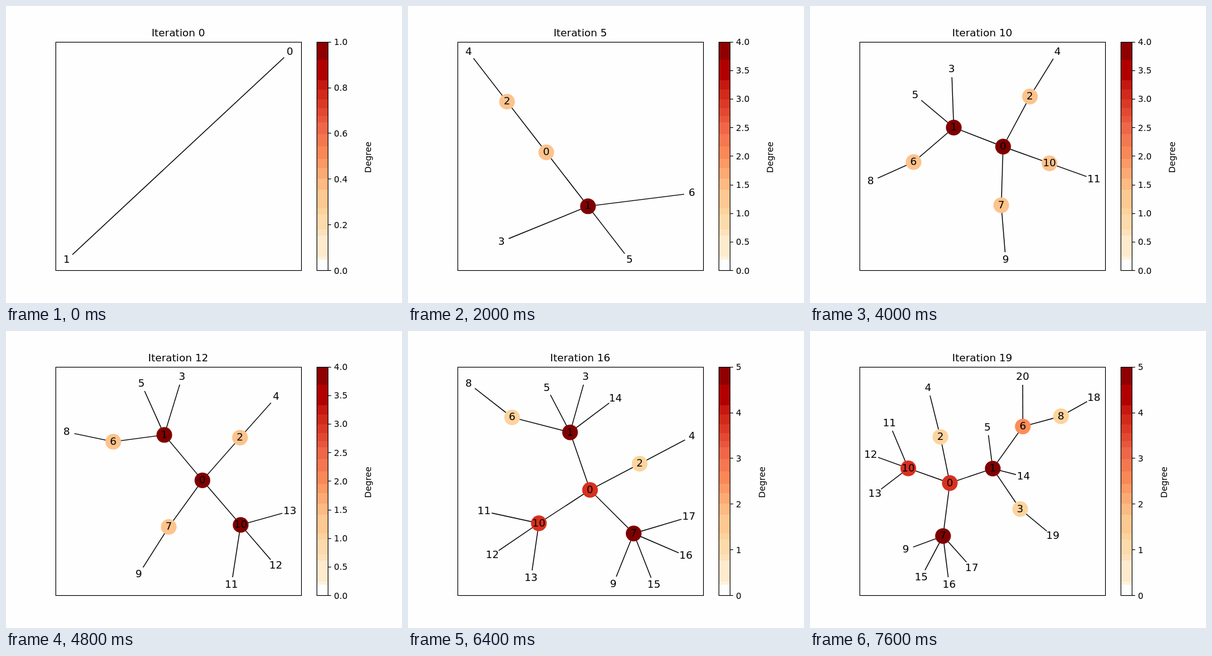
Write an HTML page that moves like this. It is 640x480 px and loops after 8000 ms.

```html
<!DOCTYPE html>
<html lang="en">
<head>
<meta charset="utf-8">
<title>Growing tree</title>
<style>
  html, body { margin: 0; width: 100%; height: 100%; overflow: hidden; background: #fefefe; }
  svg { display: block; width: 640px; height: 480px; font-family: "DejaVu Sans", sans-serif; }
</style>
</head>
<body>
<svg id="stage" viewBox="0 0 640 480"></svg>
<script>
const STEP = 400, COUNT = 20, BG = '#fefefe';
// parent of every node; node k + 1 joins at iteration k
const parent = [-1, 0, 0, 1, 2, 1, 1, 0, 6, 7, 0, 10, 10, 10, 1, 7, 7, 7, 8, 3, 6];

// Tree distances
const dist = parent.map(() => []);
parent.forEach((p, i) => {
  dist[i][i] = 0;
  for (let j = 0; j < i; j++) dist[i][j] = dist[j][i] = dist[p][j] + 1;
});

const dot = (a, b) => a.reduce((s, v, i) => s + v * b[i], 0);
const axpy = (k, a, b) => b.map((v, i) => v + k * a[i]);

// Kamada-Kawai energy and gradient of a flat x, y vector
function energy(pos) {
  const g = pos.map(() => 0), sum = [0, 0];
  let f = 0;
  pos.forEach((v, i) => sum[i % 2] += v);
  for (let i = 0; i < pos.length / 2; i++) {
    for (let j = 0; j < i; j++) {
      const dx = pos[2 * i] - pos[2 * j], dy = pos[2 * i + 1] - pos[2 * j + 1];
      const r = Math.hypot(dx, dy) || 1e-9, w = 1 / dist[i][j], off = r * w - 1;
      const k = 2 * w * off / r;
      f += off * off;
      g[2 * i] += k * dx; g[2 * i + 1] += k * dy;
      g[2 * j] -= k * dx; g[2 * j + 1] -= k * dy;
    }
  }
  return { f: f + 5e-4 * dot(sum, sum), g: g.map((v, i) => v + 1e-3 * sum[i % 2]) };
}

// Minimum of the cubic, or secant zero of the slope, through two line points
function cubic(a, b) {
  const h = b.t - a.t, th = 3 * (a.f - b.f) / h + a.d + b.d;
  const ga = Math.sign(h) * Math.sqrt(Math.max(0, th * th - a.d * b.d));
  return a.t + (ga - a.d + th) / (2 * ga - a.d + b.d) * h;
}
const secant = (a, b) => b.t + b.d / (b.d - a.d) * (a.t - b.t);

// More-Thuente line search
function search(probe, start, t) {
  let x = start, y = null, lo = 0, hi = 5 * t, width = 1e10, width1 = 2e10;
  for (let n = 0; ; n++) {
    const p = probe(t);
    const low = p.f <= start.f + 1e-3 * t * start.d;
    if (n > 19 || low && Math.abs(p.d) <= -0.9 * start.d) return p;
    const flip = p.d * x.d < 0, end = p.t > x.t ? hi : lo;
    let next;
    if (p.f > x.f) {
      const c = cubic(x, p), h = p.t - x.t;
      const q = x.t + x.d / ((x.f - p.f) / h + x.d) / 2 * h;
      next = Math.abs(c - x.t) < Math.abs(q - x.t) ? c : (c + q) / 2;
    } else if (flip) {
      const c = cubic(x, p), q = secant(x, p);
      next = Math.abs(c - p.t) > Math.abs(q - p.t) ? c : q;
    } else if (Math.abs(p.d) < Math.abs(x.d)) {
      let c = cubic(x, p);
      if (!isFinite(c) || (c - p.t) * (p.t - x.t) <= 0) c = end;
      const q = secant(x, p), nearC = Math.abs(c - p.t) < Math.abs(q - p.t);
      next = nearC === !!y ? c : q;
      if (y) {
        const cap = p.t + 0.66 * (y.t - p.t);
        next = p.t > x.t ? Math.min(cap, next) : Math.max(cap, next);
      } else next = Math.max(lo, Math.min(hi, next));
    } else next = y ? cubic(p, y) : end;

    if (p.f > x.f) y = p;
    else {
      if (flip) y = x;
      x = p;
    }
    t = next;
    if (y) {
      const gap = Math.abs(y.t - x.t);
      if (gap >= 0.66 * width1) t = (x.t + y.t) / 2;
      width1 = width;
      width = gap;
      lo = Math.min(x.t, y.t);
      hi = Math.max(x.t, y.t);
    } else {
      lo = t + 1.1 * (t - x.t);
      hi = t + 4 * (t - x.t);
    }
  }
}

// Limited-memory BFGS
function minimise(pos) {
  let { f, g } = energy(pos);
  const mem = [];
  for (let n = 0; n < 300 && Math.max(...g.map(Math.abs)) > 1e-5; n++) {
    let q = g;
    const as = [];
    for (let i = mem.length - 1; i >= 0; i--) {
      as[i] = dot(mem[i].s, q) / mem[i].sy;
      q = axpy(-as[i], mem[i].y, q);
    }
    if (mem.length) {
      const m = mem[mem.length - 1], k = m.sy / dot(m.y, m.y);
      q = q.map(v => v * k);
    }
    mem.forEach((m, i) => q = axpy(as[i] - dot(m.y, q) / m.sy, m.s, q));
    const dir = q.map(v => -v), slope = dot(dir, g);
    if (!(slope < 0)) break;
    const probe = t => {
      const at = axpy(t, dir, pos), e = energy(at);
      return { t, at, f: e.f, g: e.g, d: dot(e.g, dir) };
    };
    const p = search(probe, { t: 0, f, d: slope }, n ? 1 : 1 / Math.sqrt(dot(dir, dir)));
    if (!isFinite(p.f)) break;
    const s = axpy(-1, pos, p.at), y = axpy(-1, g, p.g), sy = dot(s, y);
    if (sy > 1e-16) mem.push({ s, y, sy });
    if (mem.length > 10) mem.shift();
    const done = (f - p.f) / Math.max(f, p.f, 1) < 2.2e-9;
    pos = p.at; f = p.f; g = p.g;
    if (done) break;
  }
  return pos;
}

// Start n nodes on a circle and relax; single precision sets the first tilt
function relax(n) {
  const start = [], mean = [0, 0];
  for (let i = 0; i < n; i++) {
    const a = Math.fround(2 * Math.PI * i / n);
    start.push(Math.fround(Math.cos(a)), Math.fround(Math.sin(a)));
  }
  start.forEach((v, i) => mean[i % 2] += v / n);
  const centred = start.map((v, i) => v - mean[i % 2]);
  const size = Math.max(...centred.map(Math.abs));
  const pos = minimise(centred.map(v => v / size));
  return Array.from({ length: n }, (_, i) => [pos[2 * i], -pos[2 * i + 1]]);
}

// Stretch a layout to the plot area
function fit(pts) {
  const scale = (k, from, span) => {
    const vs = pts.map(p => p[k]), min = Math.min(...vs), range = Math.max(...vs) - min;
    return vs.map(v => from + (v - min) / (range || 1) * span);
  };
  const xs = scale(0, 98, 360.8), ys = scale(1, 74.4, 336);
  return xs.map((x, i) => [x, ys[i]]);
}

const layouts = Array.from({ length: COUNT }, (_, k) => fit(relax(k + 2)));

// Colour map
const stops = ['fff7ec', 'fee8c8', 'fdd49e', 'fdbb84', 'fc8d59', 'ef6548', 'd7301f', 'b30000', '7f0000']
  .map(h => [0, 2, 4].map(i => parseInt(h.slice(i, i + 2), 16)));
function colour(v) {
  if (v < 0.03) return BG;
  const i = Math.min(7, Math.floor(v * 8)), u = v * 8 - i;
  return `rgb(${stops[i].map((c, k) => Math.round(c + (stops[i + 1][k] - c) * u))})`;
}

const text = (x, y, size, s, anchor = 'middle', extra = '') =>
  `<text x="${x}" y="${y}" font-size="${size}" text-anchor="${anchor}" ${extra}>${s}</text>`;
const line = (a, b, w) =>
  `<line x1="${a[0]}" y1="${a[1]}" x2="${b[0]}" y2="${b[1]}" stroke="#000" stroke-width="${w}"/>`;
const frame = (x, w) =>
  `<rect x="${x}" y="58.5" width="${w}" height="369" fill="none" stroke="#000" stroke-width="1.11"/>`;

// Uneven colour bands of the scale, top to bottom
const edges = [58, 87, 120, 135, 151, 165, 178, 188, 207, 227, 247, 262, 279, 297, 327, 337, 361, 371, 405, 410, 428];
const bands = edges.slice(1).map((y, i) => {
  const top = edges[i], v = (427.4 - (top + y) / 2) / 369.6;
  return `<rect x="502" y="${top}" width="19" height="${y - top}" fill="${colour(v)}" shape-rendering="crispEdges"/>`;
}).join('');

function scaleBar(max) {
  const tick = [0, 0.2, 0.25, 0.5, 0.5, 1][max], digits = [0, 1, 2, 1, 1, 0][max];
  let out = bands + frame(502.5, 18);
  for (let i = 0; i <= Math.round(max / tick); i++) {
    const y = 427.2 - i * tick / max * 369.6, mid = Math.round(y) + 0.5;
    out += line([520.5, mid], [525.5, mid], 1.11)
      + text(530, Math.round(y + 5.3), 13.89, (i * tick).toFixed(digits), 'start');
  }
  const x = [577, 590, 599][digits];
  return out + text(0, 0, 13.89, 'Degree', 'middle', `transform="translate(${x} 244.5) rotate(-90)"`);
}

function draw(k) {
  const pts = layouts[k], deg = pts.map(() => 0);
  let links = '';
  pts.forEach((p, i) => {
    if (!i) return;
    deg[i]++;
    deg[parent[i]]++;
    links += line(p, pts[parent[i]], 1.39);
  });
  const max = Math.max(...deg);
  const discs = pts.map(([x, y], i) =>
    `<circle cx="${x}" cy="${y}" r="12.7" fill="${colour((deg[i] - 1) / (max - 1 || 1))}"/>`).join('');
  const labels = pts.map(([x, y], i) => text(x, Math.round(y + 4.8), 16.67, i)).join('');
  return `<rect width="640" height="480" fill="${BG}"/>` + links + discs + labels
    + frame(80.5, 397) + text(278.4, 49, 16.67, 'Iteration ' + k) + scaleBar(max);
}

const stage = document.getElementById('stage');
let shown = -1;
function tick(now) {
  const k = Math.floor(now / STEP) % COUNT;
  if (k !== shown) stage.innerHTML = draw(shown = k);
  requestAnimationFrame(tick);
}
tick(performance.now());
</script>
</body>
</html>
```
